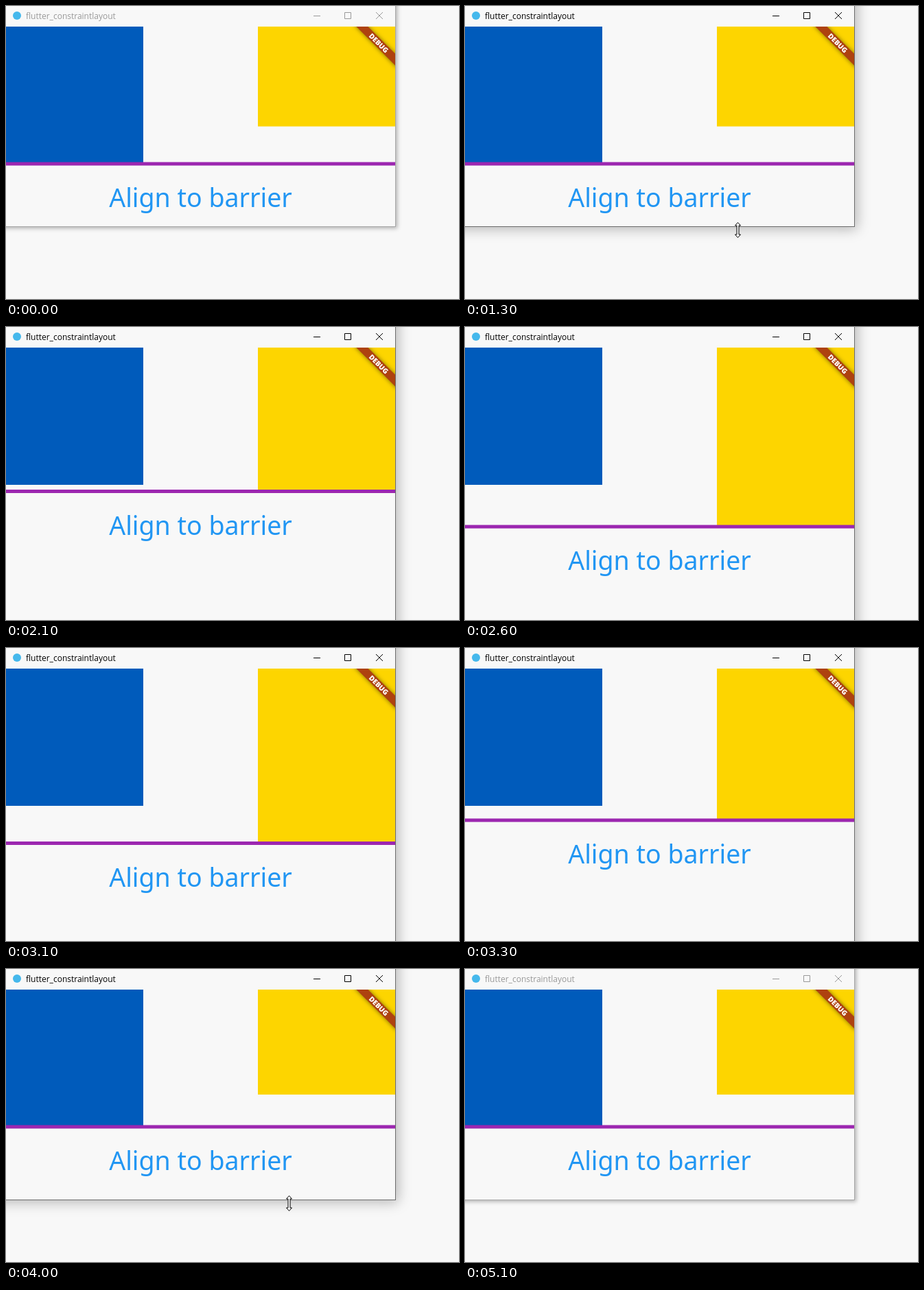
Recreate the animation shown at these times as an HTML page with a canvas. Size 660 px wide and 427 px high, loop 5.2 s.

```html
<!DOCTYPE html>
<html lang="en">
<head>
<meta charset="utf-8">
<title>Align to barrier</title>
<style>
  html, body { margin: 0; width: 100%; height: 100%; overflow: hidden; background: #f8f8f8; }
  canvas { display: block; }
</style>
</head>
<body>
<canvas id="stage" width="660" height="427"></canvas>
<script>
const ctx = document.getElementById('stage').getContext('2d');
const LOOP = 5200, STEP = 100;
const BG = '#f8f8f8';
const RIGHT = 567, BAR = 30, BLUE_END = 230;

const clamp = p => Math.min(1, Math.max(0, p));
const lerp = (a, b, p) => a + (b - a) * p;
const span = (t, from, to) => clamp((t - from) / (to - from));
const easeOut = p => 1 - (1 - p) ** 2;

// The edge is dragged down, rests, and is dragged back up.
function yellowBottom(t) {
  let y = lerp(175.5, 239.5, span(t, 1500, 2100));
  if (t > 2100) y = lerp(y, 291, span(t, 2100, 2600));
  if (t > 2600) y = lerp(y, 301, span(t, 2600, 2800));
  if (t > 3000) y = lerp(y, 201, span(t, 3000, 3600));
  if (t > 3600) y = lerp(y, 183, easeOut(span(t, 3600, 4000)));
  return Math.round(y * 2) / 2;
}

function rect(color, x, y, w, h) {
  ctx.fillStyle = color;
  ctx.fillRect(x, y, w, h);
}

function shadow(color, blur, dx = 0, dy = 0) {
  ctx.shadowColor = color;
  ctx.shadowBlur = blur;
  ctx.shadowOffsetX = dx;
  ctx.shadowOffsetY = dy;
}

function text(str, x, y, font, color, align) {
  ctx.font = font;
  ctx.fillStyle = color;
  ctx.textAlign = align;
  ctx.fillText(str, x, y);
}

function line(x1, y1, x2, y2) {
  ctx.moveTo(x1, y1);
  ctx.lineTo(x2, y2);
}

function outline(points, x, y) {
  ctx.beginPath();
  points.forEach(([px, py]) => ctx.lineTo(x + px, y + py));
  ctx.closePath();
  ctx.fillStyle = '#fff';
  ctx.fill();
  ctx.strokeStyle = '#000';
  ctx.lineWidth = 1;
  ctx.stroke();
}

function drawArrow(x, y) {
  outline([[0, 0], [0, 16], [4, 12.5], [6.5, 18], [9, 17], [6.5, 11.5], [11.5, 11.5]],
    Math.round(x) + .5, Math.round(y) + .5);
}

function drawResize(x, y) {
  const half = [[0, -11], [4, -6.5], [1.5, -6.5]];
  const turned = half.map(([px, py]) => [-px, -py]);
  const right = [...half, ...half.map(([px, py]) => [px, -py]).reverse()];
  const left = [...turned, ...turned.map(([px, py]) => [px, -py]).reverse()];
  outline([...right, ...left], Math.round(x) + .5, y);
}

function drawFrame(bottom, active) {
  ctx.save();
  if (active) shadow('rgba(0,0,0,.28)', 18, 3, 3);
  else shadow('rgba(0,0,0,.3)', 6, 2, 2);
  rect(active ? '#6b6b6b' : '#a8a8a8', -30, -30, RIGHT + 31, bottom + 31);
  ctx.restore();
  rect(BG, 0, 0, RIGHT, bottom);
}

function drawTitle(active) {
  const ink = active ? '#000' : '#999';
  ctx.fillStyle = '#45b8ec';
  ctx.beginPath();
  ctx.arc(16, 14, 6, 0, Math.PI * 2);
  ctx.fill();
  text('flutter_constraintlayout', 29, 19, '12px "Open Sans", sans-serif', ink, 'left');
  ctx.strokeStyle = ink;
  ctx.lineWidth = 1;
  ctx.beginPath();
  line(448, 14.5, 458, 14.5);
  ctx.rect(493.5, 9.5, 9, 9);
  line(539, 9, 549, 19);
  line(549, 9, 539, 19);
  ctx.stroke();
}

function drawBanner() {
  ctx.save();
  ctx.beginPath();
  ctx.rect(0, BAR, RIGHT, 300);
  ctx.clip();
  ctx.translate(RIGHT, BAR);
  ctx.rotate(Math.PI / 4);
  shadow('rgba(0,0,0,.5)', 6);
  rect('#ae420f', -44, 28, 88, 12);
  shadow('transparent', 0);
  text('DEBUG', 0, 37.7, '900 10.2px "Open Sans", sans-serif', '#fff', 'center');
  ctx.restore();
}

function drawContent(yellowEnd) {
  const barrier = Math.max(BLUE_END, yellowEnd);
  rect('#005bbb', 0, BAR, 200, BLUE_END - BAR);
  rect('#fdd500', 367, BAR, 200, yellowEnd - BAR);
  rect('#9c27b0', 0, barrier - 2.5, RIGHT, 5);
  text('Align to barrier', 283.5, barrier + 63, '37.5px "Noto Sans", sans-serif', '#2196f3', 'center');
  drawBanner();
}

function drawPointer(t, bottom) {
  if (t < 100 || t >= 4700) return;
  if (t < 900) {
    const enter = span(t, 100, 300), settle = span(t, 400, 900);
    drawArrow(lerp(lerp(648, 419, enter), 397, settle), lerp(lerp(67, 355, enter), 326, settle));
  } else if (t < 4300) {
    drawResize(lerp(397, 412, span(t, 1500, 4000)), bottom + 5.5);
  } else {
    const leave = span(t, 4200, 4400);
    drawArrow(lerp(412, 645, leave), lerp(341, 86, leave));
  }
}

function draw(now) {
  const t = Math.floor((now % LOOP) / STEP) * STEP;
  const active = t >= 1300 && t < 5100;
  const yellowEnd = yellowBottom(t);
  const bottom = 2 * yellowEnd - BAR;   // the yellow box takes half the content height
  rect(BG, 0, 0, 660, 427);
  drawFrame(bottom, active);
  drawTitle(active);
  drawContent(yellowEnd);
  drawPointer(t, bottom);
}

const start = performance.now();
function tick() {
  draw(performance.now() - start);
  requestAnimationFrame(tick);
}
tick();
</script>
</body>
</html>
```
